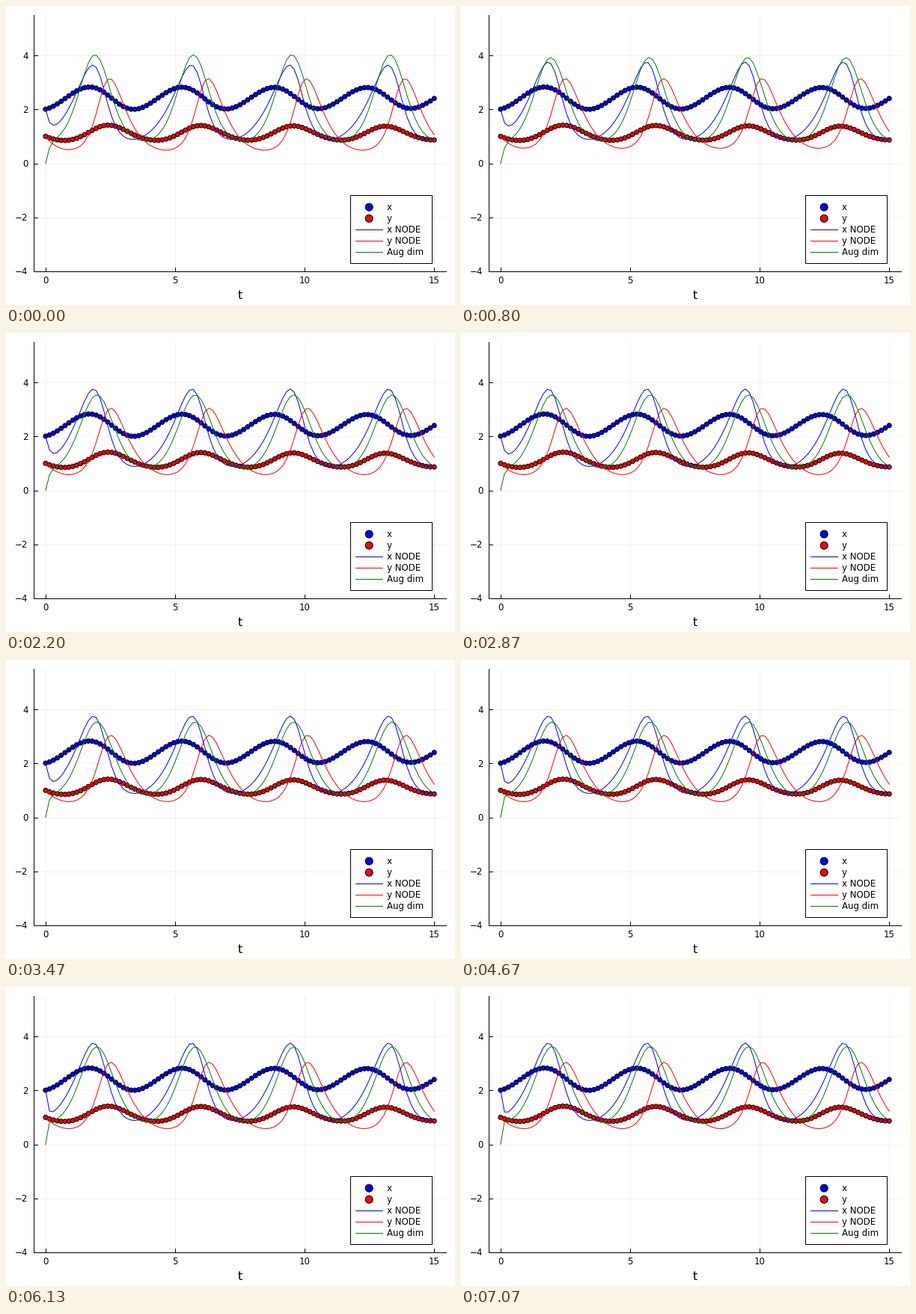
Write a matplotlib script that moves like this. It is 600 by 400 pixels and loops after 7270 ms.

```python
import numpy as np
import matplotlib.pyplot as plt
from matplotlib.animation import FuncAnimation
from matplotlib.collections import PatchCollection

W, H, DPI = 600, 400, 100
LOOP, FRAMES = 7270, 109
PAUSE = (5540, 5790)
PT = 72 / DPI                      # points per pixel
X0, XS, Y0, YS = 52.9, 34.62, 210.6, 36.1
LEFT, RIGHT, TOP, BOTTOM = 36.5, 588, 12, 355.2
PERIOD = 131.5                     # of the fitted curves, in pixels
BLUE, RED, GREEN = "#0000ff", "#ff0000", "#008000"

plt.rcParams["font.family"] = "DejaVu Sans"

t = np.arange(101) * 0.15
px = X0 + XS * t


def to_y(v):
    return Y0 - YS * v


def ramp(ms, start, end, a, b):
    u = np.clip((ms - start) / (end - start), 0, 1)
    return a + (b - a) * u * u * (3 - 2 * u)


def balance(lo, hi):
    """Equilibrium of a predator-prey variable and the depth of its well."""
    mid = (hi - lo) / np.log(hi / lo)
    return mid, hi - mid - mid * np.log(hi / mid)


def orbit(x_lo, x_hi, y_lo, y_hi, center):
    """Lotka-Volterra cycle with the given extremes; x peaks at center."""
    x_mid, x_depth = balance(x_lo, x_hi)
    y_mid, y_depth = balance(y_lo, y_hi)
    b = x_depth / y_depth

    def rate(s):
        x, y = s
        return np.array([b * x * (y_mid - y), y * (x - x_mid)])

    h, path = 0.04, [np.array([x_hi, y_mid])]
    for _ in range(160):
        s = path[-1]
        k1 = rate(s)
        k2 = rate(s + h / 2 * k1)
        k3 = rate(s + h / 2 * k2)
        k4 = rate(s + h * k3)
        path.append(s + h / 6 * (k1 + 2 * k2 + 2 * k3 + k4))
    x, y = np.array(path).T

    # one turn ends where y rises through its equilibrium again
    i = np.flatnonzero((y[10:-1] < y_mid) & (y[11:] >= y_mid))[0] + 10
    turn = i + (y_mid - y[i]) / (y[i + 1] - y[i])
    at = (px - center) / PERIOD % 1 * turn
    steps = np.arange(len(x))
    return np.interp(at, steps, x), np.interp(at, steps, y)


def bump(lo, hi, center, k):
    """Symmetric periodic hill; larger k makes it narrower."""
    c = np.cos(2 * np.pi * (px - center) / PERIOD)
    return lo + (hi - lo) * (np.exp(k * c) - np.exp(-k)) / (2 * np.sinh(k))


def settle(curve, start, decay):
    """Begin at the initial value and relax onto the cycle."""
    return curve + (start - curve[0]) * decay ** np.arange(len(curve))


def fits(ms):
    if PAUSE[0] < ms < PAUSE[1]:
        ms = PAUSE[0]
    x, y = orbit(0.89, ramp(ms, 0, 800, 3.65, 3.76),
                 ramp(ms, 0, 1200, 0.49, 0.585),
                 ramp(ms, 800, 2000, 3.15, 3.05),
                 ramp(ms, 0, 1600, 116, 117))
    top = ramp(ms, 300, 2000, 4.03, 3.54) + ramp(ms, 4700, 6500, 0, 0.09)
    aug = bump(0.84, top, ramp(ms, 0, 1800, 118.8, 121.5),
               ramp(ms, 0, 1800, 1, 0.78))
    return (settle(x, 2, ramp(ms, 2200, 7070, 0.42, 0.13)),
            settle(y, 1, 0.7),
            settle(aug, 0, ramp(ms, 1500, 6700, 0.33, 0)))


def wave(mean, amp, fade, skew, second, peak):
    a = 2 * np.pi / 3.565 * (t - peak)
    return (mean + amp * np.exp(-fade * t) * np.cos(a)
            + skew * np.sin(2 * a) + second * np.cos(2 * a))


fig = plt.figure(figsize=(W / DPI, H / DPI), dpi=DPI, facecolor="white")
ax = fig.add_axes([0, 0, 1, 1])
ax.set(xlim=(0, W), ylim=(H, 0))
ax.axis("off")


def line(xs, ys, color="black", width=1, **kw):
    return ax.plot(xs, ys, color=color, lw=width * PT, **kw)[0]


def grid(xs, ys):
    line(xs, ys, width=0.7, alpha=0.08, zorder=0)


def dots(xs, ys, color, radius, zorder=1):
    circles = [plt.Circle(p, radius) for p in zip(xs, ys)]
    ax.add_collection(PatchCollection(circles, fc=color, ec="black", lw=PT,
                                      zorder=zorder))


def label(x, y, s, ha="center", size=8.5):
    ax.text(x, y, s, ha=ha, va="baseline", fontsize=size)


for v in (0, 5, 10, 15):
    x = X0 + XS * v
    grid([x, x], [TOP, BOTTOM])
    line([x, x], [BOTTOM, BOTTOM - 5])
    label(x, 371.2, str(v))
for v in (-4, -2, 0, 2, 4):
    y = to_y(v)
    if v > -4:
        grid([LEFT, RIGHT], [y, y])
    line([LEFT, LEFT + 5], [y, y])
    label(29.6, y + 4.4, str(v).replace("-", "\u2212"), ha="right")
line([LEFT, LEFT, RIGHT], [TOP, BOTTOM, BOTTOM])
label(312.6, 391.5, "t", size=11.7)

dots(px, to_y(wave(2.415 + 0.0006 * t, 0.42, 0.006, 0.0145, 0, 1.66)), BLUE, 3)
dots(px, to_y(wave(1.12 - 0.0012 * t, 0.288, 0.009, -0.0085, 0.02, 2.455)),
     RED, 3)
curves = [line(px, px, c) for c in (BLUE, RED, GREEN)]

ax.add_patch(plt.Rectangle((459.8, 253), 109, 91, fc="white", ec="black",
                           lw=PT, zorder=3))
ENTRIES = [("x", BLUE), ("y", RED), ("x NODE", BLUE), ("y NODE", RED),
           ("Aug dim", GREEN)]
for i, (name, color) in enumerate(ENTRIES):
    y = 268.6 + 15.15 * i
    if i < 2:
        dots([484.7], [y], color, 5, zorder=4)
    else:
        line([466.5, 503], [y, y], color, zorder=4)
    label(509, y + 4.2, name, ha="left")


def update(i):
    for curve, v in zip(curves, fits(i * LOOP / FRAMES)):
        curve.set_ydata(to_y(v))
    return curves


anim = FuncAnimation(fig, update, frames=FRAMES, interval=LOOP / FRAMES,
                     repeat=True, repeat_delay=0)
plt.show()
```
